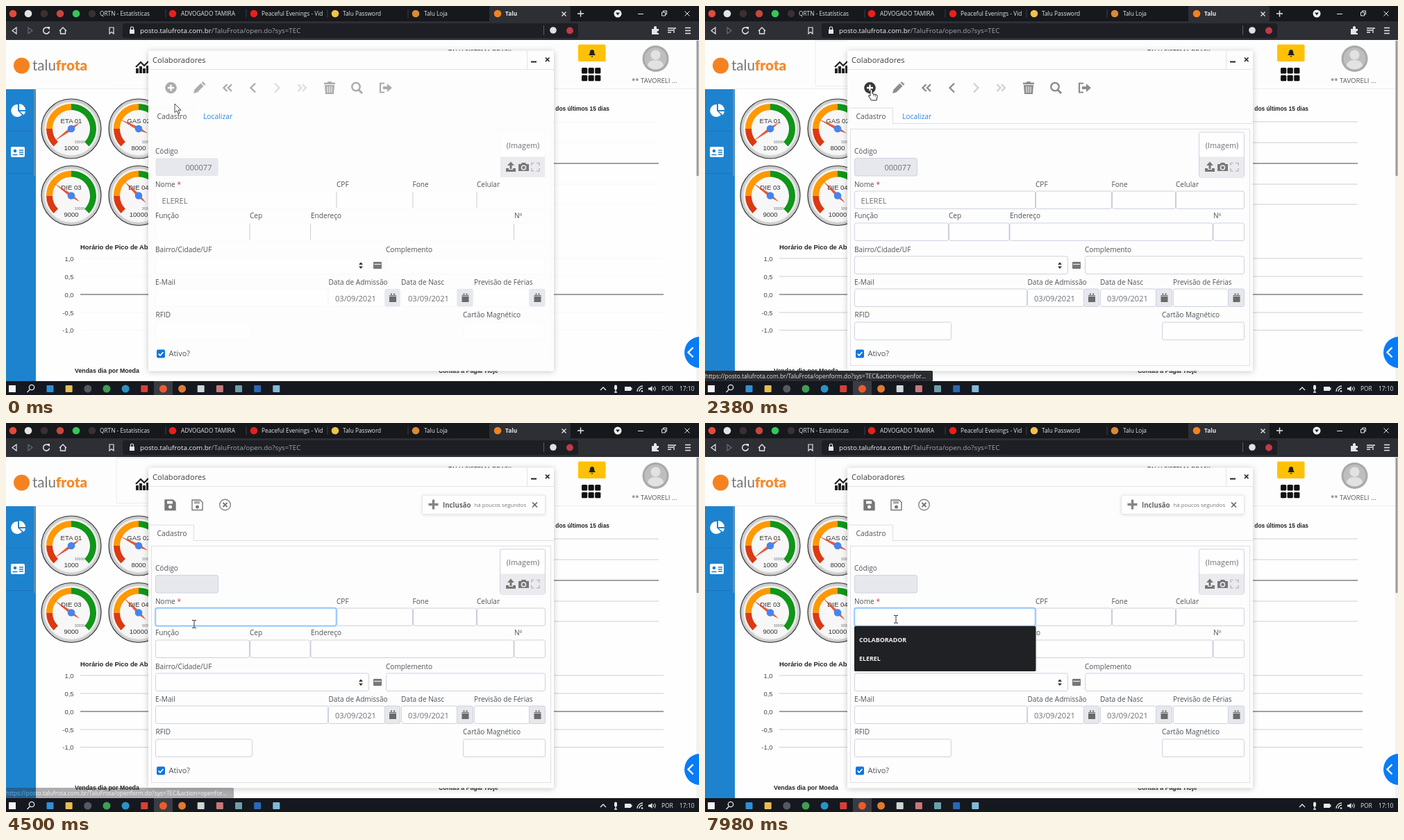
Recreate the animation shown at these times as an HTML page. Size 998x561 px, loop 8000 ms.

```html
<!DOCTYPE html>
<html lang="pt-BR">
<head>
<meta charset="utf-8">
<title>Colaboradores</title>
<style>
html, body { margin: 0; width: 100%; height: 100%; overflow: hidden; background: #fefefe; }
svg { display: block; width: 100vw; height: 100vh; }
text { font-family: "Open Sans", "Noto Sans", sans-serif; white-space: pre; }
.chart { font-family: "Liberation Sans", Arial, sans-serif; }
.brand { font-family: Lato, sans-serif; }
.shadow { filter: drop-shadow(0 1px 4px rgba(0, 0, 0, .22)); }
.lift { filter: drop-shadow(0 1px 2px rgba(0, 0, 0, .1)); }
</style>
</head>
<body>
<svg id="stage" viewBox="0 0 998 561" preserveAspectRatio="none"></svg>
<script>
const LOOP = 8000;
const GREY = '#8d8d8d', INK = '#505357', VALUE = '#6c6f73', EDGE = '#cfd2e0', FILL = '#e7e8ed';

const text = (x, y, s, size = 10.1, fill = INK, more = '') =>
  `<text x="${x}" y="${y}" font-size="${size}" fill="${fill}" ${more}>${s}</text>`;
const rect = (x, y, w, h, fill, more = '') =>
  `<rect x="${x}" y="${y}" width="${w}" height="${h}" fill="${fill}" ${more}/>`;
const disc = (x, y, r, fill, more = '') => `<circle cx="${x}" cy="${y}" r="${r}" fill="${fill}" ${more}/>`;
const line = (d, stroke, w = 1, more = '') =>
  `<path d="${d}" fill="none" stroke="${stroke}" stroke-width="${w}" ${more}/>`;
const shape = (d, fill, more = '') => `<path d="${d}" fill="${fill}" ${more}/>`;
const group = (id, body) => `<g id="${id}">${body}</g>`;
const bold = 'font-weight="700"', end = 'text-anchor="end"', mid = 'text-anchor="middle"';
const chart = 'class="chart"';

function browser() {
  const tabs = [
    [135, 'QRTN - Estatísticas'], [252, 'ADVOGADO TAMIRA'], [368, 'Peaceful Evenings - Vid'],
    [485, 'Talu Password'], [602, 'Talu Loja'], [719, 'Talu', bold]
  ];
  const marks = [
    [10, '#e24a3b'], [32, '#e4e4e4'], [55, '#3b3030'], [78, '#c5473d'], [101, '#35c759'], [124, '#3a3033'],
    [240, '#e8201c'], [357, '#e8201c'], [474, '#f0c14b'], [590, '#d98b35'], [708, '#f58220']
  ];
  const light = '#e6e6e8';
  return rect(0, 0, 998, 22, '#17181c') + rect(0, 22, 998, 27, '#2d2f35') +
    rect(696, 0, 117, 23, '#2d2f35', 'rx="3"') +
    rect(168, 25, 656, 21, '#1d1f24', 'rx="3"') +
    [230, 346, 463, 579].map(x => line(`M${x} 5V17`, '#3c3e44')).join('') +
    marks.map(([x, c]) => disc(x, 11, 5.3, c)).join('') +
    tabs.map(([x, s, b = '']) => text(x, 14, s, 8.3, light, b)).join('') +
    line('M800.5 8.5l6 6m0-6l-6 6', light, 1.3) + line('M823 11h9m-4.5-4.5v9', light, 1.4) +
    disc(881, 11, 5.5, '#f3f3f3') + shape('M878 9.5h6l-3 4z', '#222') +
    line('M910 11.5h8M944.5 9h5v5h-5zM946.5 9V7h5v5h-2M977.5 7.5l7 7m0-7l-7 7', light) +
    line('M15 31l-6 4.5 6 4.5z', light, 1.2) + line('M32 31l6 4.5-6 4.5z', '#6d7078', 1.1) +
    line('M61.5 32.5a4.5 4.5 0 1 0 1 4', light, 1.5) + shape('M59 30h4v4.5z', light) +
    line('M77 36l5-5 5 5M78.5 35v5h7v-5', light, 1.3) +
    line('M149 31h6v9l-3-2.5-3 2.5z', light, 1.2) +
    rect(178, 34, 7, 6, light) + line('M179.5 34v-2a2 2 0 0 1 4 0v2', light, 1.2) +
    text(193, 38.7, 'posto.talufrota.com.br<tspan fill="#a2a5ab">/TaluFrota/open.do?sys=TEC</tspan>', 9.8, '#f5f5f5') +
    line('M774.5 28v14', '#5b5d63') + disc(788, 35, 4.8, '#dfe0e5') + disc(812, 35.5, 5, '#bf3b48') +
    shape('M930 33h3v-2a2 2 0 0 1 4 0v2h3v3h-1a1.5 1.5 0 0 0 0 3h1v2h-10z', light) +
    line('M953 32h8M953 35h8M953 38h5M962 39v-7h3', light, 1.3) +
    line('M978 31.5h8M978 35.5h8M978 39.5h8', light, 1.3);
}

function arc(cx, cy, r, from, to, colour) {
  const at = a => `${cx + r * Math.sin(a * Math.PI / 180)} ${cy - r * Math.cos(a * Math.PI / 180)}`;
  return line(`M${at(from)}A${r} ${r} 0 0 1 ${at(to)}`, colour, 9);
}

function gauge(cx, cy, name, value) {
  const turn = v => `transform="rotate(${-135 + 270 * v / 30000} ${cx} ${cy})"`;
  return disc(cx, cy, 43, '#cccccc', 'stroke="#333" stroke-width="1.2"') +
    disc(cx, cy, 38.7, '#f7f7f7', 'stroke="#e0e0e0" stroke-width="1.5"') +
    arc(cx, cy, 31.5, -135, -90, '#dc3912') + arc(cx, cy, 31.5, -90, 0, '#ff9900') +
    arc(cx, cy, 31.5, 0, 135, '#109618') +
    text(cx, cy - 8.5, name, 9.6, '#333', `${mid} ${chart}`) +
    text(cx, cy + 30.5, value, 9.5, '#333', `${mid} ${chart}`) +
    text(cx + 12, cy + 20.5, '30000', 5.2, '#777', `${mid} ${chart}`) +
    shape(`M${cx} ${cy - 31}l2.4 31-2.4 15-2.4-15z`, '#dc3912', `opacity=".8" ${turn(value)}`) +
    disc(cx, cy, 5.3, '#4684ee');
}

function page() {
  const levels = [364, 390, 416, 442, 467.5];
  const grid = (x1, x2, ys) => ys.map((y, i) =>
    line(`M${x1} ${y}H${x2}`, i === 2 ? '#444' : '#cfcfd4', 1, i === 2 ? '' : 'class="fine"')).join('');
  let dots = '';
  for (let i = 0; i < 6; i++) dots += rect(829 + i % 3 * 9.6, 89 + (i > 2) * 10.7, 8.2, 8.6, '#111', 'rx="1.5"');
  return rect(0, 49, 998, 492, '#fefefe') +
    rect(0, 49, 998, 71, '#fdfdfd') + line('M43 119.5H994', '#ececee') +
    line('M205 50.5H159v65h46', '#ededf0', 1, 'class="fine"') +
    disc(22.5, 86, 11.5, '#f58220') +
    text(38, 93, 'talu<tspan font-weight="900" fill="#f58a2c">frota</tspan>', 20.5, '#777', 'class="brand"') +
    shape('M187 97v-7h4v7zm5 0v-10h4v10zm5 0v-7h4v7zm5 0v-11h4v11z', '#222') +
    line('M187 88l7-7 5 5 6-6', '#222', 2.2) +
    text(637, 69.5, 'TALU SISTEMA BRASIL', 9.2, '#333') +
    rect(824, 55.5, 39.5, 24.5, '#ffc107', 'rx="2"') +
    shape('M839 71q2-2 2-5a3 3 0 0 1 6 0q0 3 2 5zM842.5 72h3l-1.5 2z', '#222') + dots +
    disc(935.5, 76, 19, '#a9a9a9') + disc(935.5, 76, 16, '#bebebe') +
    disc(935.5, 70.5, 7, '#e2e2e2') + shape('M924 86q1-8 11.5-8t11.5 8a15 15 0 0 1-23 0z', '#e2e2e2') +
    text(901, 111, '** TAVORELI ...', 9.6, '#555') +
    rect(0, 120, 43, 421, '#1e83ce') + line('M0 180.5h40M0 241.5h40', '#1b74b8') +
    rect(40, 120, 2.5, 125, '#5f8fb5') +
    shape('M17 142v9l6 6a9 9 0 1 1-6-15z', '#fff') + shape('M19 141a9 9 0 0 1 9 9h-9z', '#fff') +
    shape('M20 152h8a9 9 0 0 1-2.5 5z', '#fff') +
    rect(7, 203, 20, 15, '#fff', 'rx="2"') + disc(13, 209, 2.3, '#1c80ca') +
    line('M9.5 214.5h7M19 208h6M19 211h6M19 214h6', '#1c80ca', 1.5) +
    gauge(94, 177, 'ETA 01', 1000) + gauge(191, 177, 'GAS 02', 8000) +
    gauge(94, 273.5, 'DIE 03', 9000) + gauge(191, 273.5, 'DIE 04', 10000) +
    text(107, 351, 'Horário de Pico de Abastecimento', 9.4, '#222', `${chart} ${bold}`) +
    ['1,0', '0,5', '0,0', '-0,5', '-1,0'].map((s, i) => text(97.5, levels[i] + 3.5, s, 9.4, '#444', `${end} ${chart}`)).join('') +
    grid(107, 947, levels) + grid(700, 940, [167, 197, 227, 257, 286]) +
    text(869, 151, 'dos últimos 15 dias', 8.4, '#222', `${end} ${chart} ${bold}`) +
    text(99, 528.5, 'Vendas dia por Moeda', 8.8, '#222', `${chart} ${bold}`) +
    text(623, 529, 'Contas a Pagar Hoje', 8.8, '#222', `${chart} ${bold}`) +
    text(79, 547, '1,0', 9, '#444', chart) + text(602, 547, '1,0', 9, '#444', chart) +
    rect(994, 49, 4, 492, '#f2f2f3') + rect(994.5, 50, 3, 195, '#9a9a9e') +
    disc(999.5, 499.5, 22.5, '#087cf5') + line('M989.5 492.5l-7 7 7 7', '#fff', 2.4);
}

function field(x1, x2, y, fill = '#fefefe', h = 25.5) {
  return rect(x1 + .5, y, x2 - x1 - 1, h, fill, 'rx="2.5"') +
    rect(x1 + .5, y, x2 - x1 - 1, h, 'none', `rx="2.5" stroke="${EDGE}" class="fine"`);
}
const row = (y, ...xs) => xs.slice(1).map((x, i) => field(xs[i], x, y)).join('') +
  xs.slice(1, -1).map(x => line(`M${x} ${y + 1}v23`, '#c4c6d2', .8)).join('');

function dateField(x1, x2, x3, value) {
  const c = (x2 + x3) / 2;
  return field(x1, x2, 408) + field(x2 - 1, x3, 408, FILL) + text(x1 + 10, 425.5, value, 11.1, VALUE) +
    shape(`M${c - 5} 417h10v10h-10zM${c - 3} 414.5h2v2h-2zm4 0h2v2h-2z`, '#6a6a6a') +
    line(`M${c - 5} 418.5h10`, FILL, .8);
}

function form() {
  const labels = [
    [215, 212.5, 'Código'], [215, 260.5, 'Nome <tspan fill="#dc3545">*</tspan>'], [476, 260.5, 'CPF'],
    [585.5, 260.5, 'Fone'], [678, 260.5, 'Celular'], [215, 306, 'Função'], [351, 306, 'Cep'],
    [439, 306, 'Endereço'], [732, 306, 'Nº'], [215, 354.5, 'Bairro/Cidade/UF'], [547, 354.5, 'Complemento'],
    [215, 401.5, 'E-Mail'], [464.5, 401.5, 'Data de Admissão'], [569, 401.5, 'Data de Nasc'],
    [674, 401.5, 'Previsão de Férias'], [215.5, 449, 'RFID'], [658, 449, 'Cartão Magnético']
  ];
  return rect(205, 64.5, 584, 462, '#fdfdfd', 'class="shadow"') +
    line('M205 91.5H789M750.5 65V91', '#e3e3e8') +
    text(211, 82, 'Colaboradores', 11.2, '#3c3f44') +
    line('M756 80.5h8', '#222', 2) + line('M777 74.5l5.5 5.5m0-5.5l-5.5 5.5', '#222', 1.7) +
    line('M206 169.5v-22.5h64.5v22.5H789', '#dedee6', 1, 'class="fine"') +
    text(217.5, 162.5, 'Cadastro', 10.3) +
    rect(209.5, 177.5, 575, 341, 'none', 'stroke="#e0e0e8" class="fine"') +
    field(711, 777, 182, '#fefefe', 65) + rect(712, 217.5, 64, 29.5, '#ebebef') +
    text(744.5, 204.7, '(Imagem)', 10.8, VALUE, mid) +
    shape('M720 234h4v2h6v-2h4v5h-14zM725.5 235v-5h-3.5l5-5.5 5 5.5h-3.5v5z', '#777') +
    shape('M738 228h3.5l1.5-2h5l1.5 2h3.5v10h-15z', '#777') + disc(745.5, 233, 3, 'none', 'stroke="#ebebef" stroke-width="1.5"') +
    line('M757 230v-3.5h3.5M764 226.5h4v3.5M768 234v4h-4M760.5 238H757v-4', '#c0c0c4', 1.7) +
    field(215, 306, 219.5, FILL) + row(267, 215, 476, 586, 678, 777) + row(313, 215, 351, 438.5, 731.5, 777) +
    field(215, 523, 361) + shape('M508 373l3-3.5 3 3.5zM508 375.5l3 3.5 3-3.5z', '#333') +
    rect(529, 369, 12, 10, '#777', 'rx="1"') + line('M530 372.5h10', '#eee', 1.2) +
    field(547, 777, 361) + field(215, 464, 408) +
    dateField(464, 546, 568, '03/09/2021') + dateField(569, 650, 673, '03/09/2021') + dateField(674, 754, 777, '') +
    field(215, 355, 456) + field(658, 777, 456) +
    labels.map(l => text(...l)).join('') +
    rect(217, 495.5, 12, 12, '#0f75e0', 'rx="2"') + line('M219.5 501.5l2.5 2.5 4.5-5', '#fff', 1.7) +
    text(234.5, 505, 'Ativo?', 11);
}

function viewing() {
  return group('icons',
    disc(237.5, 118, 8.3, GREY, 'id="add"') + line('M233 118h9m-4.5-4.5v9', '#fff', 2.3) +
    shape('M270 126l1.5-5.5 9-9 4 4-9 9zM281.5 110.5l2-1.5 4 4-2 1.5z', GREY) +
    line('M318.5 113l-5 5 5 5M325 113l-5 5 5 5M359 111.5l-6.5 6.5 6.5 6.5', GREY, 2.4) +
    line('M387 111.5l6.5 6.5-6.5 6.5M420.5 113l5 5-5 5M427 113l5 5-5 5', '#d2d2d4', 2.4) +
    rect(458, 110.5, 16, 2.5, GREY) + rect(463, 109, 6, 2, GREY) + shape('M459 114h14l-1 13h-12z', GREY) +
    line('M463 116v9M466 116v9M469 116v9', '#eee', 1.2) +
    disc(504, 116.5, 5.7, 'none', `stroke="${GREY}" stroke-width="2.5"`) + line('M508 121l5 5', GREY, 3) +
    line('M545 111.5h-6v13h6', GREY, 2.2) + shape('M543 116h6v-4l7 6-7 6v-4h-6z', GREY)) +
    text(284, 162.5, 'Localizar', 10.3, '#2b87e3') + text(296.5, 236.5, '000077', 11.1, VALUE, end) +
    text(224.5, 284.5, 'ELEREL', 11.1, VALUE);
}

function inserting() {
  const floppy = (x, hollow) => shape(`M${x - 7.5} 111h11.5l3.5 3.5v11h-15z`, hollow ? '#fff' : '#777', 'stroke="#777" stroke-width="1.4"') +
    rect(x - 4.5, 112.5, 8, 4, hollow ? '#aaa' : '#fff') + disc(x, 121, 2.5, hollow ? '#777' : '#fff');
  return floppy(236.5) + floppy(275.5, true) +
    disc(315.5, 118, 7.8, 'none', 'stroke="#858585" stroke-width="1.4"') +
    line('M312.5 115l6 6m0-6l-6 6', '#777', 1.9) +
    rect(599.5, 104, 177, 27.5, '#fefefe', 'rx="2" class="lift" stroke="#e6e6ea"') +
    line('M608.5 117.5h14m-7-7v14', '#858585', 3.4) +
    text(629, 121.5, 'Inclusão', 9.7, '#626569', bold) + text(674.5, 120.5, 'há poucos segundos', 7.8, '#777') +
    line('M758 114.5l7 7m0-7l-7 7', '#6b6b6b', 1.6) +
    rect(215, 267, 261, 25.5, '#fefefe', 'rx="2.5" stroke="#bfdeff" stroke-opacity=".7" stroke-width="3.4"') +
    rect(215.5, 267, 260, 25.5, '#fefefe', 'rx="2.5" stroke="#86c0fb" stroke-width="1.3"') +
    line('M225 272v16', '#333', 1, 'id="caret"');
}

function suggestions() {
  return rect(215, 293, 261.5, 65, '#202124', 'rx="1.5" class="lift"') +
    text(222, 316, 'COLABORADOR', 8.9, '#f3f3f3', bold) + text(222, 342.5, 'ELEREL', 8.9, '#f3f3f3', bold);
}

function taskbar() {
  const apps = ['#2f8fd8', '#e8bd55', '#56595f', '#3f9e52', '#2a93c6', '#d93f35', '#ee5a2c', '#e27a30', '#cfd6d4',
    '#c9777a', '#6d9fa9', '#2c67b8', '#80b9dc'];
  const round = [2, 3, 4, 6, 7];
  const w = '#e8eaec';
  return rect(0, 541, 998, 20, '#15181e') + rect(213, 541, 27, 20, '#3a3c43') +
    rect(4, 547, 10, 10, '#f2f4f6') + disc(37, 550, 3.7, 'none', `stroke="${w}" stroke-width="1.3"`) +
    line('M34.5 553l-4 4', w, 1.4) +
    apps.map((c, i) => round.includes(i) ? disc(63.5 + i * 27.15, 552, 5.5, c)
      : rect(58.5 + i * 27.15, 547, 10, 10, c, 'rx="1"')).join('') +
    line('M856 554l4-4 4 4', w, 1.4) + rect(876, 546.5, 4, 7, w, 'rx="2"') + line('M878 553v4m-2 0h4', w, 1.3) +
    rect(891, 549, 9, 6, w) + rect(900, 550.5, 1.5, 3, w) +
    line('M909 556a8 8 0 0 1 8-8M912 556a5 5 0 0 1 5-5', w, 1.3) + disc(916, 555.5, 1.3, w) +
    shape('M925 550.5h2.5l3-2.5v8l-3-2.5H925z', w) + line('M932 550q1.5 2 0 4M934 548.5q3 3.5 0 7', w) +
    text(944, 555, 'POR', 8.4, w) + text(970, 555, '17:10', 8.4, w);
}

const cursors =
  group('arrow', shape('M0 0v12.5l3-2.5 2 4.5 2-1-2-4.3h4z', '#fff', 'stroke="#333" stroke-width=".9"')) +
  group('hand', shape('M0 1.5q1.5-2.5 3 0v5l6 1.5q1.5.5 1.2 2.5l-1.2 5.5H1.5l-4-6q0-2 2.5-.5z', '#fff', 'stroke="#222"') +
    line('M5 8v2M7.5 8.5v2', '#222', .8)) +
  group('beam', line('M-3-5.5h2.2l.8.7.8-.7H3M0-5V5M-3 5.5h2.2l.8-.7.8.7H3', '#333'));

document.getElementById('stage').innerHTML = page() + form() +
  group('viewing', viewing()) + group('inserting', inserting()) + group('suggestions', suggestions()) +
  browser() + taskbar() +
  group('status', rect(0, 526, 328, 15, '#2b2c30', 'rx="1.5"') +
    text(0, 537, 'https://posto.talufrota.com.br/TaluFrota/openform.do?sys=TEC&amp;action=openfor...', 8.4, '#e4e4e6')) +
  group('cursor', cursors);

// Times of interface events in ms.
const HOVER = 140, TIP = 1400, INSERT = 2700, TIP_OUT = 4340, LIST = 5420;
// Pointer path: time, x, y.
const path = [
  [0, 243, 141], [20, 243, 141], [300, 239.5, 121], [980, 239.5, 121], [981, 238, 120], [3200, 238, 120],
  [3440, 256, 176], [3760, 282.5, 260], [3940, 278, 277], [4040, 278, 277], [4400, 271, 290],
  [4900, 271, 290], [5300, 264, 288], [6600, 264, 288], [7100, 269, 286], [7420, 269, 286], [7900, 275, 283], [8000, 275, 283]
];
const byId = id => document.getElementById(id);
const show = (id, on) => byId(id).style.opacity = +on;
const ramp = (t, from, to) => Math.min(1, Math.max(0, (t - from) / (to - from)));
const fine = document.querySelectorAll('.fine');

function render(t) {
  const i = path.findIndex((p, k) => t < path[k + 1][0]);
  const [t0, x0, y0] = path[i], [t1, x1, y1] = path[i + 1];
  const k = (t - t0) / (t1 - t0), x = x0 + (x1 - x0) * k, y = y0 + (y1 - y0) * k;
  byId('cursor').setAttribute('transform', `translate(${x} ${y})`);
  const kind = t < HOVER ? 'arrow' : t < INSERT ? 'hand' : y < 268 ? 'arrow' : 'beam';
  for (const id of ['arrow', 'hand', 'beam']) show(id, id === kind);

  const detail = .1 + .7 * ramp(t, 20, 400) + .2 * ramp(t, 1380, 1980);
  fine.forEach(el => el.style.opacity = detail);
  show('icons', .72 + .28 * ramp(t, 20, 320));
  byId('add').setAttribute('fill', t < HOVER ? GREY : '#383838');

  show('viewing', t < INSERT);
  show('inserting', t >= INSERT);
  show('suggestions', t >= LIST);
  const focused = t < LIST ? INSERT : LIST;
  show('caret', (t - focused) % 1000 < 500);
  show('status', ramp(t, TIP, TIP + 120) * (1 - ramp(t, TIP_OUT, TIP_OUT + 260)));
}

function tick() {
  render(performance.now() % LOOP);
  requestAnimationFrame(tick);
}
tick();
</script>
</body>
</html>
```
